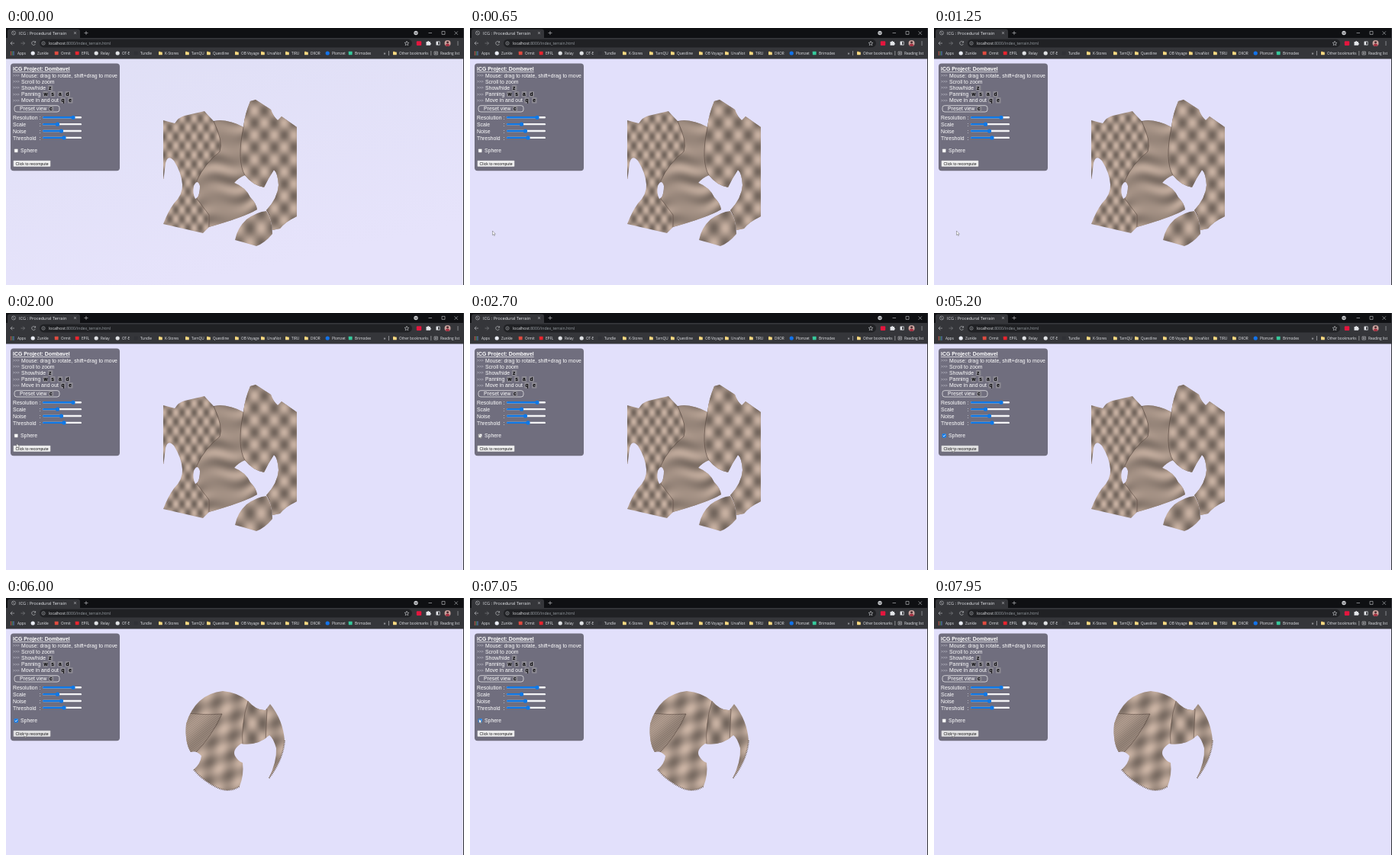
These frames come from a looping animation (600 px wide and 337 px high, 8000 ms). An HTML page with a canvas:

```html
<!DOCTYPE html>
<html lang="en">
<head>
<meta charset="utf-8">
<title>Procedural Terrain</title>
<style>
  html, body { margin: 0; width: 100%; height: 100%; overflow: hidden; background: #e2e0fb; }
  svg, canvas { position: absolute; left: 0; top: 0; width: 100vw; height: 100vh; }
  text { font-family: "Liberation Sans", Arial, sans-serif; white-space: pre; }
  .chrome text { font-family: "Open Sans", "Noto Sans", sans-serif; fill: #e4e6ea; }
  .line { fill: none; stroke: #c9cbce; stroke-width: .6; }
</style>
</head>
<body>
<svg viewBox="0 0 600 337" preserveAspectRatio="none">
  <defs>
    <linearGradient id="opening" x2=".4" y2="1"><stop stop-color="#dfdff5"/><stop offset="1" stop-color="#e6e3fb"/></linearGradient>
  </defs>
  <rect width="600" height="337" fill="#e2e0fb"/>
  <rect id="fade" width="600" height="337" fill="url(#opening)"/>
  <g id="browser" class="chrome"></g>
  <g id="panel" transform="translate(0 .4)"></g>
  <path id="cursor" d="M0 0V5.6L1.3 4.5 2.2 6.5 3 6.1 2.1 4.2H3.9Z" fill="#fff" stroke="#444" stroke-width=".4"/>
</svg>
<canvas id="cube" width="600" height="337"></canvas>
<canvas id="sphere" width="600" height="337"></canvas>
<script>
const el = id => document.getElementById(id);
const rect = (x, y, w, h, fill, r = 0, more = '') =>
  `<rect x="${x}" y="${y}" width="${w}" height="${h}" rx="${r}" fill="${fill}" ${more}/>`;
const disc = (x, y, r, fill, more = '') => `<circle cx="${x}" cy="${y}" r="${r}" fill="${fill}" ${more}/>`;
const text = (x, y, size, str, more = '') => `<text x="${x}" y="${y}" font-size="${size}" ${more}>${str}</text>`;
const line = d => `<path class="line" d="${d}"/>`;

// Browser window

const folder = x => rect(x - 2.2, 30.7, 2.4, 2, '#e8bd55', .5) + rect(x - 2.2, 31.4, 4.8, 3.8, '#f7d983', .5);
const dot = color => x => disc(x, 33, 2.6, color);
const box = color => x => rect(x - 2.4, 30.8, 4.8, 4.4, color, .4);
const bookmarks = [
  [41, 'Zunkle', dot('#e9ecf4')], [72, 'Ormit', box('#df4b40')], [99, 'EPFL', box('#e8242e')],
  [124, 'Relay', dot('#dfe1e4')], [152, 'OT-E', dot('#dfe1e4')], [176, 'Tundle', box('#303136')],
  [208, 'K-Stores', folder], [243, 'TarnQU', folder], [271, 'Questline', folder],
  [308, 'OB Voyage', folder], [342, 'UrvaNot', folder], [374, 'TIRU', folder], [399, 'DKOR', folder],
  [427, 'Plomzet', dot('#1273eb')], [457, 'Brimodex', box('#36c99c')], [515, 'Other bookmarks', folder]
];

let apps = '';
for (let i = 0; i < 9; i++)
  apps += rect(5.8 + i % 3 * 1.8, 30.8 + Math.floor(i / 3) * 1.8, 1.2, 1.2, ['#e5584b', '#58a65c', '#5d91ee'][i % 3]);

el('browser').innerHTML =
  rect(0, 0, 600, 14, '#0f1013') + rect(599, 0, 1, 337, '#35363a') +
  rect(2, 1.5, 95, 14, '#35363a', 3) + rect(0, 13, 600, 27.5, '#35363a') +
  disc(10, 6.5, 2.5, 'none', 'stroke="#9b9da1" stroke-width=".8"') + line('M8.4 5L11.5 8') +
  text(17, 8.7, 5.7, 'ICG : Procedural Terrain') +
  line('M89 5l3 3m0-3l-3 3M102.5 6.5h5m-2.5-2.5v5') +
  disc(537, 6.5, 2.7, '#c4c6ca') + '<path d="M535.6 5.9l1.4 1.4 1.5-1.4" fill="none" stroke="#202124" stroke-width=".8"/>' +
  line('M553.5 6.5h4.5M571 4.4h4v4h-4zM587.5 4.4l4.4 4.4m0-4.4l-4.4 4.4') +
  line('M11 20H6m2.3-2.4L6 20l2.3 2.4') +
  `<g opacity=".55">${line('M19.5 20h5m-2.3-2.4l2.3 2.4-2.3 2.4')}</g>` +
  line('M38.4 18.7a2.5 2.5 0 1 0 .1 2.2M38.6 17.2v1.9h-2') +
  rect(44, 14.8, 488, 10.6, '#202124', 5.3) +
  disc(49, 20, 2.2, 'none', 'stroke="#a8abb0" stroke-width=".6"') + line('M49 19.6v1.6M49 18.6v.5') +
  text(56, 22.1, 5.2, 'localhost<tspan fill="#9aa0a6">:8000/index_terrain.html</tspan>') +
  line('M525 17.2l.8 2 2.1.1-1.6 1.4.5 2.1-1.8-1.2-1.8 1.2.5-2.1-1.6-1.4 2.1-.1z') +
  rect(537.8, 17.3, 6.4, 5.6, '#e3163e', 1) +
  '<path d="M550.5 18h1.7a1 1 0 0 1 2 0h1.7v1.8a1 1 0 0 1 0 2v1h-5.4z" fill="#e4e6ea"/>' +
  rect(563.5, 17.5, 5, 5, '#e4e6ea', .5) + rect(566, 18.3, 1.8, 3.4, '#35363a') +
  disc(578.5, 20, 4, '#c9a29d') + disc(578.5, 18.7, 1.5, '#4b2f33') +
  '<path d="M575.4 22.5q3-4 6.2 0-3 3-6.2 0" fill="#a32e40"/>' +
  [18, 20, 22].map(y => disc(592, y, .6, '#e4e6ea')).join('') +
  apps + text(15, 35, 4.7, 'Apps') +
  bookmarks.map(([x, label, icon]) => icon(x - 5.8) + text(x, 35, 4.7, label)).join('') +
  text(494.5, 35, 6, '»') + line('M501.5 30v6M556.8 30v6') +
  line('M561 31h4.4v4H561zM562 32.3h2.4M562 33.6h2.4') + text(569, 35, 4.7, 'Reading list');

// Control panel

const SIZE = 6.88, white = 'fill="#fff"';
const row = i => 64.3 + i * 8.07;
const keys = (x, y, letters) => [...letters].map((c, i) =>
  rect(x - 1.2 + i * 9.7, y - 5.9, 6.6, 7.6, '#8b8992', 1) +
  text(x + i * 9.7, y, 6.7, c, 'font-weight="bold" fill="#000"')).join('');
const hint = (i, label, keyX = 0, letters = '') =>
  text(9, row(i) - .4, 5, '&gt;&gt;&gt;', 'fill="#c9c8d2"') + text(20, row(i), SIZE, label, white) + keys(keyX, row(i), letters);
const slider = (i, label, thumb) => {
  const y = 120 + i * 8.87;
  return text(9, y, SIZE, label, white) + text(43.8, y, SIZE, ':', white) +
    rect(48, y - 4.3, 51, 2.4, '#f4f4f6', 1.2) + rect(48, y - 4.3, thumb - 48, 2.4, '#0f78e6', 1.2) +
    disc(thumb, y - 3.1, 2.6, '#0f78e6');
};

el('panel').innerHTML =
  rect(6, 46.2, 143, 140.7, '#706e7e', 4) +
  text(9, 56, 6.9, 'ICG Project: Dombavel', white + ' font-weight="bold" text-decoration="underline"') +
  hint(0, 'Mouse: drag to rotate, shift+drag to move') + hint(1, 'Scroll to zoom') +
  hint(2, 'Show/hide', 56, 'z') + hint(3, 'Panning', 49.5, 'wsad') + hint(4, 'Move in and out', 72.5, 'qe') +
  rect(11, 101.3, 59, 8.3, 'none', 3, 'stroke="#f2f2f4" stroke-width=".7"') +
  text(18, 107.8, SIZE, 'Preset view', white) + keys(57, 107.6, 'c') +
  slider(0, 'Resolution', 88) + slider(1, 'Scale', 67.5) + slider(2, 'Noise', 72.5) + slider(3, 'Threshold', 76) +
  rect(10.9, 158, 4.8, 4.8, '#fff', .8, 'stroke="#77757f" stroke-width=".5"') +
  `<g id="tick">${rect(10.7, 157.8, 5.2, 5.2, '#0f78e6', .8)}<path d="M11.8 160.4l1.1 1.2 2-2.4" fill="none" stroke="#fff" stroke-width=".9"/></g>` +
  text(19, 162.8, SIZE, 'Sphere', white) +
  '<rect id="button" x="9.6" y="173.3" width="48.8" height="8.2" rx=".8" stroke="#77757f" stroke-width=".5"/>' +
  text(12.6, 179.2, 5.2, 'Click to recompute', 'fill="#111"');

// Terrain: silhouettes filled with a brightness formula

const { sin, cos, PI } = Math;

// Staggered bumps, darkest at (x0, y0).
const bumps = (x0, y0, dx, dy) => (x, y) => -.8 * cos(2 * PI * (x - x0) / dx) * cos(2 * PI * (y - y0) / dy);
const folds = (x, y) => .65 * sin((y + x * .3) / 4.2 + 1.6 * sin(x / 13)) * (.6 + .4 * cos((x - y) / 15));
const shell = (x, y) => .25 * sin((x + y) / 9) + .18 * sin(x * 1.7 + y * 2.3);
const skin = (x, y) => .75 * sin((x + y * .9) / 6.5) * cos((x * .7 - y) / 9) + .1;

function texture(tone) {
  const canvas = document.createElement('canvas');
  canvas.width = 600; canvas.height = 337;
  const g = canvas.getContext('2d'), image = g.createImageData(600, 337);
  for (let i = 0; i < 600 * 337; i++) {
    const light = 1 + .33 * tone(i % 600, Math.floor(i / 600));
    image.data.set([157 * light, 139 * light, 127 * light, 255], i * 4);
  }
  g.putImageData(image, 0, 0);
  return canvas;
}

// Paints each region of a silhouette; the first region is the whole of it.
function model(id, silhouette, base, regions) {
  const g = el(id).getContext('2d');
  const paint = (path, tone) => {
    g.save();
    g.clip(path, 'evenodd');
    g.drawImage(texture(tone), 0, 0);
    g.restore();
  };
  g.save();
  const body = new Path2D(silhouette);
  paint(body, base);
  g.clip(body, 'evenodd');
  g.strokeStyle = 'rgba(62,48,40,.45)';
  for (const [d, tone] of regions) {
    paint(new Path2D(d), tone);
    g.stroke(new Path2D(d));
  }
  g.restore();
  return g;
}

const wall = `M206 121L221 125Q226 117 234 115L260 109Q267 117 272 122Q291 119 311 130Q313 112 320 96L327 94
  347 107Q350 116 356 121L361 116 381 130V247Q366 254 359 263L349 265Q348 250 341 239Q356 223 357 206Q356 190 351 186
  Q343 198 338 209Q323 206 313 193Q305 196 299 203Q314 209 320 222Q328 230 329 238Q312 248 266 261L258 269 206 257
  Q212 241 220 230Q232 218 231 205Q230 190 220 174Q212 165 209 177L206.5 198H206Z
  M246 207Q251 197 254 207Q254 222 248 224Q244 217 246 207Z`;

model('cube', wall, bumps(222, 142, 16, 24), [
  ['M272 122Q285 150 280 162Q260 178 250 200L250 224 266 245V270H335V130L311 118Z', folds],
  ['M311 130Q302 175 313 193L345 245 340 270H390V90H310Z', bumps(338, 140, 26, 32)]
]);
model('cube', 'M300 278Q303 262 315 251Q329 241 341 240Q349 251 349 270Q339 282 328 286L311 281Z', bumps(319, 262, 30, 40), []);

const shellFront = `M284 122Q304 124 317 135Q328 148 340 147L346 139Q363 160 365 187Q363 212 344 237Q355 214 354 197
  Q350 183 345 180Q330 194 308 191Q296 199 300 207Q304 214 310 216Q312 232 306 247Q294 255 280 250Q259 241 246 225
  Q255 217 256 207Q249 199 242 202Q234 190 236 165Q248 126 284 122Z`;

const fringe = model('sphere', shellFront, skin, [
  ['M283 152Q268 184 248 203L230 200V150Q260 154 283 152Z', shell],
  ['M317 135Q308 165 310 195L340 190 342 146Z', bumps(322, 184, 28, 40)]
]);
fringe.strokeStyle = '#7b6b60';
fringe.lineWidth = 2;
fringe.setLineDash([1, 1.2]);
fringe.stroke(new Path2D('M246 225Q259 241 280 250Q294 255 306 247M365 187Q363 212 344 237'));

// Timeline

const LOOP = 8000, SWAP = 5250, CHECK = 2850, UNCHECK = 7150;
const resting = [29.5, 266], checkbox = [11.8, 158.6], button = [23.5, 176.8];
const moves = [[1450, 2150, resting, checkbox], [3150, 3700, checkbox, button],
  [6550, 6950, button, checkbox], [7350, 7750, checkbox, button]];

function cursorAt(t) {
  const [start, end, from, to] = moves.findLast(m => m[0] <= t) || moves[0];
  const p = Math.min(1, Math.max(0, (t - start) / (end - start))), ease = p * p * (3 - 2 * p);
  return from.map((v, k) => v + (to[k] - v) * ease);
}

const show = (id, on) => { el(id).style.visibility = on ? 'visible' : 'hidden'; };

function draw() {
  const t = (performance.now() - began) % LOOP, [x, y] = cursorAt(t);
  el('fade').setAttribute('opacity', Math.min(1, Math.max(0, 1 - (t - 50) / 150)));
  show('cube', t < SWAP);
  show('sphere', t >= SWAP);
  show('tick', t >= CHECK && t < UNCHECK);
  show('cursor', t >= 100);
  el('cursor').setAttribute('transform', `translate(${x} ${y})`);
  el('button').setAttribute('fill', y > 173.5 && y < 181.7 ? '#e3e3e5' : '#f0f0f1');
  requestAnimationFrame(draw);
}
const began = performance.now();
draw();
</script>
</body>
</html>
```
